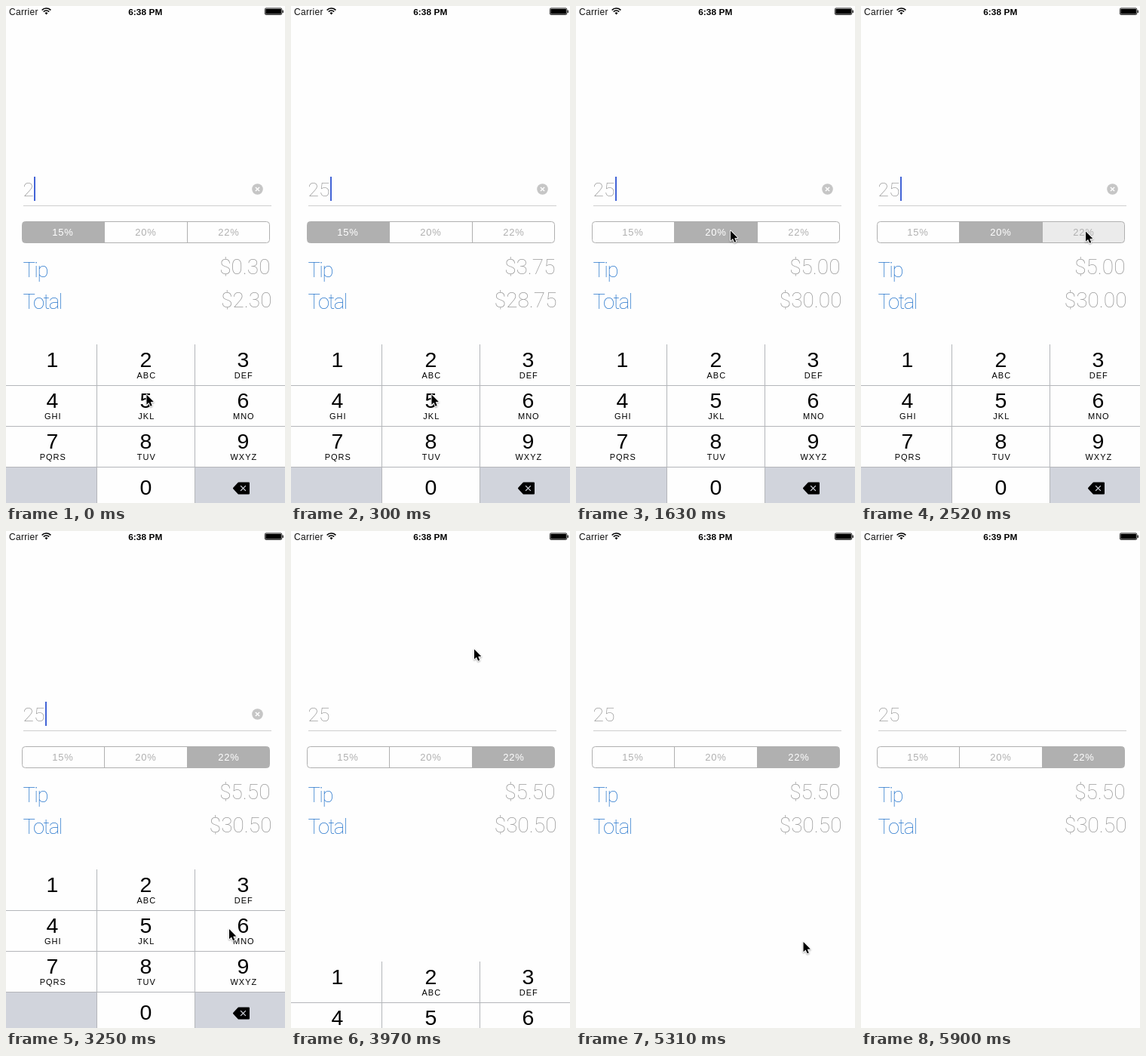
These frames come from a looping animation (370 px wide and 658 px high, 6.53 s). An HTML page with a canvas:

```html
<!DOCTYPE html>
<html lang="en">
<head>
<meta charset="utf-8">
<title>Tip calculator</title>
<style>
html, body { margin: 0; width: 100%; height: 100%; overflow: hidden; background: #fefefe; }
canvas { display: block; width: 370px; height: 658px; }
</style>
</head>
<body>
<canvas id="stage"></canvas>
<script>
const W = 370, H = 658, LOOP = 6530, STEP = 147;
const GREY = '#b0b0b0', FAINT = '#969696', BLUE = '#2273cb', PAPER = '#fefefe';
const SANS = '"Liberation Sans", Arial, sans-serif';
const THIN = 'Roboto, "Liberation Sans", sans-serif';

const canvas = document.getElementById('stage');
const ctx = canvas.getContext('2d');
const ratio = window.devicePixelRatio || 1;
canvas.width = W * ratio;
canvas.height = H * ratio;

// Pointer stops: step, x, y
const POINTER = [
  [0, 186, 514], [3, 186, 514], [10, 204.5, 297], [11, 204.5, 297],
  [13, 300, 298], [20, 296, 298], [22, 295.5, 526.5], [26, 242.5, 156],
  [28, 242.5, 156], [31, 256.5, 361], [32, 256.5, 361], [39, 330, 662]
];
const RATES = [15, 20, 22];
const SEGMENT_EDGES = [21.5, 130.5, 240.5, 349.5];
const COLUMNS = [61.5, 185.5, 314.5];
const KEY_LETTERS = ['', 'ABC', 'DEF', 'GHI', 'JKL', 'MNO', 'PQRS', 'TUV', 'WXYZ'];

function text(str, x, y, font, color, align = 'left', spacing = 0) {
  ctx.font = font;
  ctx.fillStyle = color;
  ctx.textAlign = align;
  ctx.letterSpacing = spacing + 'px';
  ctx.fillText(str, x, y);
  ctx.letterSpacing = '0px';
}

function rect(x, y, w, h, color) {
  ctx.fillStyle = color;
  ctx.fillRect(x, y, w, h);
}

function polygon(points) {
  ctx.beginPath();
  points.forEach(([x, y]) => ctx.lineTo(x, y));
  ctx.closePath();
}

function cross(x, y, r, color, width) {
  ctx.strokeStyle = color;
  ctx.lineWidth = width;
  ctx.beginPath();
  ctx.moveTo(x - r, y - r);
  ctx.lineTo(x + r, y + r);
  ctx.moveTo(x + r, y - r);
  ctx.lineTo(x - r, y + r);
  ctx.stroke();
}

function statusBar(clock) {
  text('Carrier', 4, 11.5, '12px ' + SANS, '#111', 'left', 0.3);
  text(clock, 184.8, 11.5, 'bold 11.8px ' + SANS, '#000', 'center', 0.1);

  ctx.strokeStyle = '#000';
  ctx.lineWidth = 1.7;
  for (const r of [8, 5]) {
    ctx.beginPath();
    ctx.arc(53.5, 11, r, -Math.PI * 0.76, -Math.PI * 0.24);
    ctx.stroke();
  }
  ctx.fillStyle = '#000';
  ctx.beginPath();
  ctx.moveTo(53.5, 11.5);
  ctx.arc(53.5, 11, 2.6, -Math.PI * 0.78, -Math.PI * 0.22);
  ctx.fill();

  ctx.lineWidth = 0.8;
  ctx.beginPath();
  ctx.roundRect(343.4, 2.9, 22.4, 8.6, 1.5);
  ctx.stroke();
  rect(344.3, 3.8, 20.6, 6.8, '#000');
  rect(366.5, 5.6, 1.3, 3.4, '#000');
}

function amountField(bill, editing, caretOn) {
  text(bill, 22.5, 252, '100 26.5px ' + THIN, FAINT);
  rect(23, 264, 329, 1, '#cfcfcf');
  if (!editing) return;
  if (caretOn) rect(bill.length > 1 ? 52 : 37, 226, 2, 32, '#4263d6');
  ctx.fillStyle = '#c6c6c6';
  ctx.beginPath();
  ctx.arc(333.5, 242.5, 7.3, 0, Math.PI * 2);
  ctx.fill();
  cross(333.5, 242.5, 2.6, '#fff', 1.4);
}

function segments(selected, pressed, tint) {
  ctx.save();
  ctx.beginPath();
  ctx.roundRect(21.5, 285.5, 328, 28, 4);
  ctx.clip();
  RATES.forEach((rate, i) => {
    const x = SEGMENT_EDGES[i], w = SEGMENT_EDGES[i + 1] - x;
    if (i === selected) rect(x, 285, w, 29, GREY);
    else if (i === pressed) rect(x, 285, w, 29, `rgba(176,176,176,${tint})`);
  });
  ctx.restore();

  ctx.strokeStyle = GREY;
  ctx.lineWidth = 1;
  ctx.beginPath();
  ctx.roundRect(21.5, 285.5, 328, 28, 4);
  for (const x of SEGMENT_EDGES.slice(1, 3)) {
    ctx.moveTo(x, 285.5);
    ctx.lineTo(x, 313.5);
  }
  ctx.stroke();

  RATES.forEach((rate, i) => {
    const color = i === selected ? '#fff' : GREY;
    text(rate + '%', 75.5 + i * 110, 304, '13px ' + SANS, color, 'center', 0.8);
  });
}

function results(bill, rate) {
  const tip = bill * rate / 100;
  const money = value => '$' + value.toFixed(2);
  const labelFont = '200 27.5px ' + THIN, valueFont = '100 28px ' + THIN;
  text('Tip', 22.5, 359, labelFont, BLUE, 'left', -1.6);
  text('Total', 22.5, 400.5, labelFont, BLUE, 'left', -1.6);
  text(money(tip), 350.5, 355, valueFont, FAINT, 'right');
  text(money(bill + tip), 352.5, 399, valueFont, FAINT, 'right');
}

function keyboard(offset, fivePressed) {
  if (offset > 209) return;
  const line = '#b4b6ba', shade = '#d1d4dc';
  const digitFont = '28.5px ' + SANS;
  ctx.save();
  ctx.translate(0, offset);
  rect(0, 448, W, 210, PAPER);
  rect(0, 611, 120, 47, shade);
  rect(251, 611, 119, 47, shade);
  if (fivePressed) rect(121, 503, 129, 53, shade);
  for (const x of [120, 250]) rect(x, 448, 1, 210, line);
  for (const y of [502, 556, 610]) rect(0, y, W, 1, line);

  KEY_LETTERS.forEach((letters, i) => {
    const x = COLUMNS[i % 3], y = 478 + Math.floor(i / 3) * 54;
    text(String(i + 1), x, y, digitFont, '#000', 'center');
    text(letters, x + 0.8, y + 15, '11px ' + SANS, '#000', 'center', 1);
  });
  text('0', COLUMNS[1], 647, digitFont, '#000', 'center');

  ctx.fillStyle = ctx.strokeStyle = '#000';
  ctx.lineWidth = 2;
  ctx.lineJoin = 'round';
  polygon([[302, 638.5], [308.5, 631.5], [322, 631.5], [322, 645.5], [308.5, 645.5]]);
  ctx.fill();
  ctx.stroke();
  cross(314.5, 638.5, 3.4, shade, 1.3);
  ctx.restore();
}

function pointerAt(step) {
  const i = POINTER.findIndex(stop => stop[0] > step);
  if (i < 0) return null;
  const [s0, x0, y0] = POINTER[i - 1], [s1, x1, y1] = POINTER[i];
  const p = (step - s0) / (s1 - s0), e = p * p * (3 - 2 * p);
  return [x0 + (x1 - x0) * e, y0 + (y1 - y0) * e];
}

function pointer(position) {
  if (!position) return;
  ctx.save();
  ctx.translate(...position);
  ctx.scale(0.92, 0.92);
  polygon([[0.5, 0.5], [0.5, 15], [3.8, 12], [6.1, 17.2], [8.4, 16.2], [6.2, 11.2], [10.7, 10.9]]);
  ctx.lineJoin = 'round';
  ctx.shadowColor = 'rgba(0,0,0,.35)';
  ctx.shadowBlur = 2 * ratio;
  ctx.shadowOffsetY = ratio;
  ctx.strokeStyle = '#fff';
  ctx.lineWidth = 2;
  ctx.stroke();
  ctx.shadowColor = 'transparent';
  ctx.fillStyle = '#000';
  ctx.fill();
  ctx.restore();
}

// Critically damped slide of the keyboard
function slideOffset(time) {
  const k = Math.max(0, time - 3862) * 0.01826;
  return Math.round(210 * (1 - Math.exp(-k) * (1 + k)));
}

function draw(time) {
  const step = Math.floor(time / STEP), now = step * STEP;
  const bill = step < 1 ? '2' : '25';
  const selected = step < 11 ? 0 : step < 18 ? 1 : 2;
  const pressed = step === 10 ? 1 : step === 16 || step === 17 ? 2 : -1;
  const caretOn = now < 730 || (now - 730) % 1000 >= 400;

  ctx.setTransform(ratio, 0, 0, ratio, 0, 0);
  rect(0, 0, W, H, PAPER);
  statusBar(step < 40 ? '6:38 PM' : '6:39 PM');
  amountField(bill, now < 3862, caretOn);
  segments(selected, pressed, step === 16 ? 0.12 : 0.25);
  results(Number(bill), RATES[selected]);
  keyboard(slideOffset(now), step === 1);
  pointer(pointerAt(step));
}

let start = null;
function tick(now) {
  if (start === null) start = now;
  draw(Math.max(0, now - start) % LOOP);
  requestAnimationFrame(tick);
}
draw(0);
requestAnimationFrame(tick);
</script>
</body>
</html>
```
